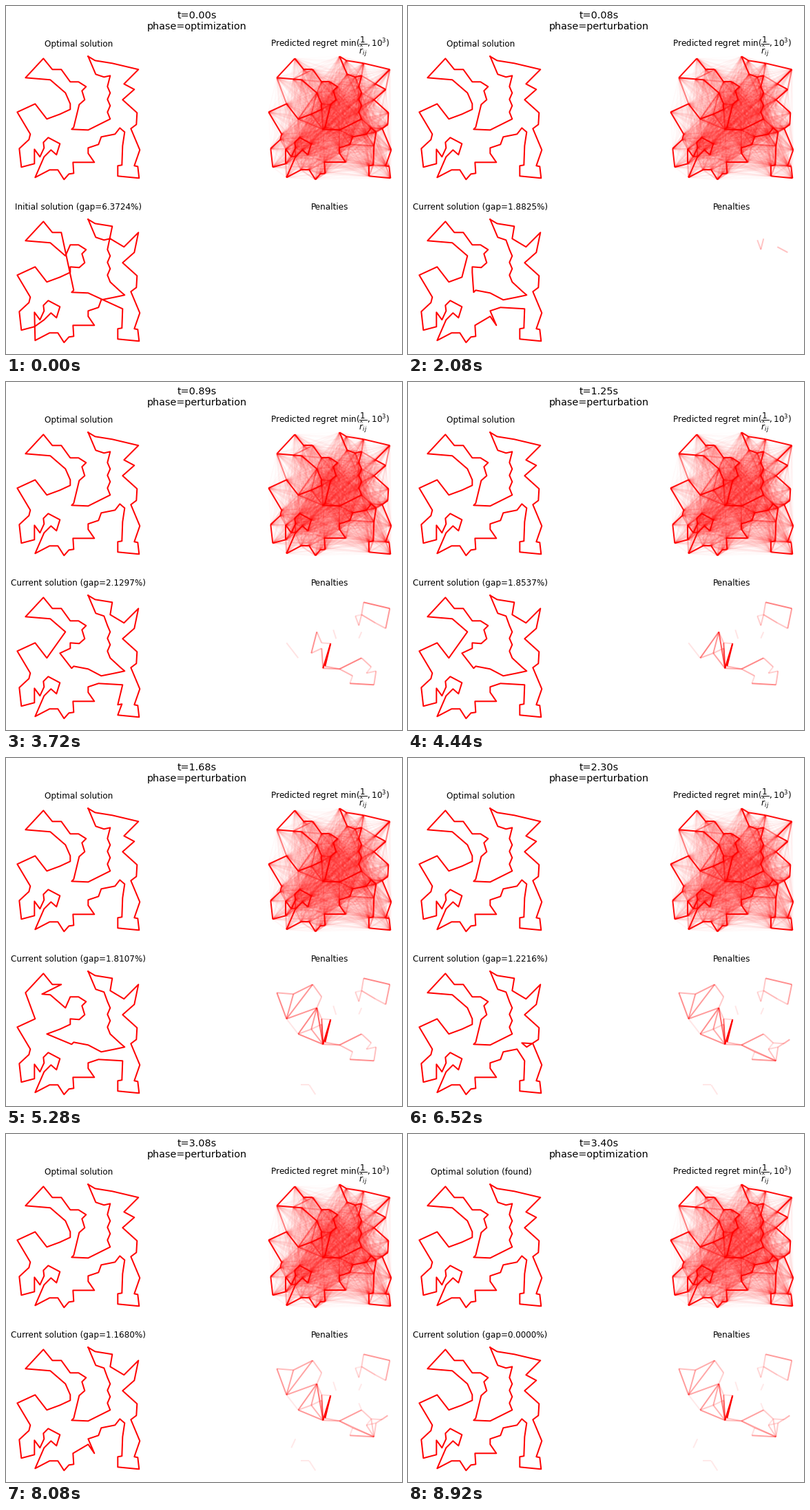
A matplotlib script for the animation above (10000 ms loop, 575x506 px).

```python
import numpy as np
import matplotlib.pyplot as plt
from matplotlib.animation import FuncAnimation
from matplotlib.collections import LineCollection

W, H, DPI = 575, 506, 64
PT = 72 / DPI                      # points per pixel
FRAMES, STEP = 250, 40
START, END = 48, 218               # the search runs between these frames
DX, DY = 365, 237                  # panel offsets

# Cities in the order of the best tour; the wavy column follows a formula
COAST = [(119, 73), (129, 79), (154, 83), (192, 92), (171, 113), (186, 121),
         (169, 136), (190, 155), (189, 172), (181, 178), (194, 209),
         (186, 232), (191, 233), (193, 250), (162, 247), (162, 232),
         (168, 231), (169, 203), (172, 183), (165, 177), (158, 186),
         (138, 190), (134, 201), (119, 206), (119, 214), (128, 227),
         (97, 227), (98, 243), (91, 244), (84, 252), (75, 238), (63, 238),
         (42, 249), (55, 219), (65, 209), (73, 216), (78, 200), (61, 191),
         (54, 198), (55, 206), (49, 219), (41, 208), (41, 229), (22, 234),
         (19, 207), (33, 194), (35, 186), (16, 154), (42, 142), (59, 164),
         (78, 157), (93, 150), (93, 142), (86, 126), (64, 107), (52, 106),
         (28, 104), (54, 76), (67, 92), (80, 92), (93, 110), (105, 110),
         (116, 117), (110, 123), (114, 136), (106, 143), (98, 176),
         (95, 179), (119, 180), (151, 164)]
WAVE = [(149 - 2 * (-1) ** k, 154 - 9.3 * k) for k in range(5)]
CITY = np.array(COAST + WAVE + [(151, 101), (142, 103), (130, 99)]) + 0.3
N = len(CITY)


def run(a, b):
    """Cities a..b inclusive, in either direction."""
    return list(range(a, b + 1)) if a <= b else list(range(a, b - 1, -1))


def edges(tour):
    return {(min(e), max(e)) for e in zip(tour, tour[1:] + tour[:1])}


def span(a, b):
    return np.hypot(*(CITY[a] - CITY[b]).T)


def length(tour):
    return span(tour, np.roll(tour, 1)).sum()


BEST = run(0, N - 1)
CORNER = [0, 1, 2, 75, 4, 3]
LOWER = CORNER + run(5, 17) + run(22, 48)
BRIDGE = [67, 66, 68, 21, 20, 18, 19] + run(69, 74) + [76, 77]
INITIAL = ([0, 77, 76, 75, 4, 3] + run(5, 17) + [68, 67, 66] + run(59, 53)
           + run(60, 65) + run(52, 42) + run(33, 41) + run(32, 20)
           + [18, 19] + run(69, 74) + [2, 1])

# frame, search seconds, gap in percent, tour, penalty hub and its spokes
STAGES = [
    (START, 0, 6.3724, INITIAL, 0, ()),
    (76, 0.55, 1.2176, LOWER + [49, 50] + run(53, 65) + [52, 51] + BRIDGE,
     65, (66, 67)),
    (111, 1.25, 1.8537, LOWER + [49] + run(53, 65) + run(52, 50) + BRIDGE,
     67, (52, 53)),
    (132, 1.68, 1.8107, LOWER + run(56, 59) + run(55, 53) + run(60, 65)
     + run(52, 49) + BRIDGE, 48, (53, 55, 59)),
    (163, 2.30, 1.2216, CORNER + run(5, 8) + [18, 19] + run(9, 17)
     + run(20, 74) + [76, 77], 17, (21, 68)),
    (184, 2.73, 0.5031, CORNER + run(5, 74) + [76, 77], 17, (19, 20)),
    (END, 3.40, 0, BEST, 0, ()),
]
KEYS = [s[0] for s in STAGES]
TIMES = [s[1] for s in STAGES]
MIDDLES = [(a + b) // 2 for a, b in zip(KEYS[1:-2], KEYS[2:-1])]
BEGINS = [0, START] + MIDDLES + [END]


def make_penalties():
    """Edges in dispute become penalised, longer ones more heavily."""
    rng = np.random.default_rng(7)
    best, found = edges(BEST), {}
    for k in range(1, len(STAGES) - 1):
        _, _, _, tour, hub, spokes = STAGES[k]
        marks = {(hub, s): 1.2 / k for s in spokes}
        for a, b in sorted(edges(tour) ^ best):
            marks.setdefault((a, b), min(0.45, 0.012 * span(a, b)))
        for a in rng.integers(0, N - 1, 2):
            marks.setdefault((a, a + 1), 0.1)
        for edge, weight in marks.items():
            onset = rng.uniform(TIMES[k - 1], TIMES[k])
            found.setdefault(edge, (onset, weight))
    return found


PENALTIES = make_penalties()


def perturb(tour, seed):
    """Cheapest of a few random segment reversals."""
    rng = np.random.default_rng(seed)
    trials = []
    for _ in range(30):
        a = rng.integers(1, N - 6)
        b = a + rng.integers(2, 5)
        trials.append(tour[:a] + tour[a:b][::-1] + tour[b:])
    return min(trials, key=length)


def state(i):
    stage = np.searchsorted(BEGINS, i, side="right") - 1
    _, _, gap, tour, _, _ = STAGES[stage]
    if START < i < END and i not in KEYS:
        trial = perturb(tour, i // 2)
        gap += 100 * (length(trial) - length(tour)) / length(BEST)
        tour = trial
    return tour, max(gap, 0)


fig = plt.figure(figsize=(W / DPI, H / DPI), dpi=DPI, facecolor="white")
ax = fig.add_axes([0, 0, 1, 1])
ax.axis("off")


def set_stage():
    ax.set_xlim(0, W)
    ax.set_ylim(H, 0)
    ax.set_aspect("auto")


def heat_lines():
    """All city pairs; short, central and once used edges are stronger."""
    rng = np.random.default_rng(4)
    a, b = np.triu_indices(N, 1)
    d = span(a, b)
    centre = (CITY[a] + CITY[b]) / 2 - (122, 165)
    alpha = 0.012 + 0.022 * np.exp(-(np.hypot(*centre.T) / 55) ** 2)
    alpha *= rng.lognormal(-0.1, 0.4, d.size)
    alpha += 0.7 * np.exp(-(d / 22) ** 2) * rng.random(d.size)
    used = set().union(*(edges(s[3]) for s in STAGES[1:]))
    best = edges(BEST)
    for k, pair in enumerate(zip(a, b)):
        if pair in used:
            alpha[k] = 0.95 if pair in best else 0.45
    order = np.argsort(alpha)
    segs = np.stack([CITY[a], CITY[b]], 1)[order] + (DX, 0)
    rgba = [(1, 0, 0, v) for v in np.clip(alpha[order], 0, 1)]
    return LineCollection(segs, colors=rgba, linewidths=2 * PT)


# Render the dense graph once and reuse it as a picture
set_stage()
heat = ax.add_collection(heat_lines())
fig.canvas.draw()
x0, x1, y0, y1 = 375, 570, 62, 262
picture = np.asarray(fig.canvas.buffer_rgba())[y0:y1, x0:x1, :3].copy()
heat.remove()
ax.imshow(picture, extent=(x0, x1, y1, y0), interpolation="nearest", zorder=0)
set_stage()


def label(x, y, s="", size=12):
    return ax.text(x, y, s, fontsize=size * PT, family="DejaVu Sans",
                   ha="center", va="baseline")


def outline(tour, dy=0):
    p = CITY[tour + tour[:1]] + (0, dy)
    return p[:, 0], p[:, 1]


def tour_line():
    return ax.plot([], [], color="red", lw=2 * PT,
                   solid_joinstyle="round")[0]


time_text = label(277, 18, size=14.4)
phase_text = label(277, 34, size=14.4)
best_title = label(106, 59)
tour_title = label(105, 296)
label(470.5, 59, r"Predicted regret min$(\dfrac{1}{\hat{r}_{ij}}, 10^3)$")
label(470, 296, "Penalties")
tour_line().set_data(*outline(BEST))
current = tour_line()
penalty = ax.add_collection(LineCollection(
    [CITY[list(e)] + (DX, DY) for e in PENALTIES], linewidths=2 * PT))


def update(i):
    t = np.interp(i, KEYS, TIMES)
    tour, gap = state(i)
    calm = i < START + 4 or i >= END - 3 or 20 <= i % 25 <= 22
    time_text.set_text(f"t={t:.2f}s")
    phase_text.set_text("phase=" + ("optimization" if calm else "perturbation"))
    best_title.set_text("Optimal solution" + (" (found)" if i >= END else ""))
    kind = "Initial" if i < START else "Current"
    tour_title.set_text(f"{kind} solution (gap={gap:.4f}%)")
    current.set_data(*outline(tour, DY))
    fade = 1.2 - 0.1 * t
    penalty.set_color([(1, 0, 0, min(1, weight * fade) if t >= onset else 0)
                       for onset, weight in PENALTIES.values()])
    return time_text, phase_text, best_title, tour_title, current, penalty


anim = FuncAnimation(fig, update, frames=FRAMES, interval=STEP,
                     repeat=True, repeat_delay=0, blit=False)
plt.show()
```
